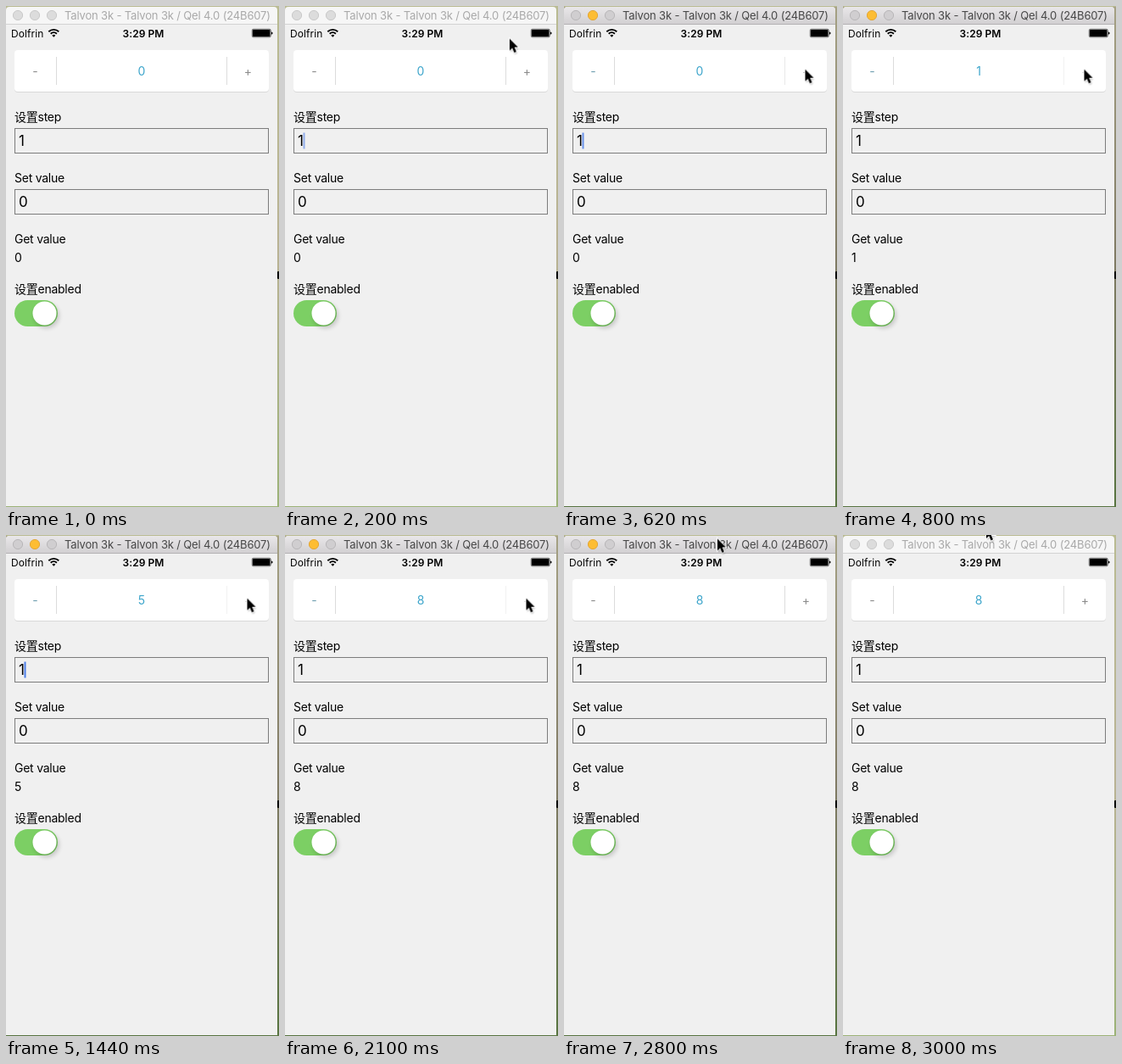
Recreate the animation shown at these times as an HTML page. Size 322 by 591 pixels, loop 3.04 s.

```html
<!DOCTYPE html>
<html lang="en">
<head>
<meta charset="utf-8">
<title>Stepper demo</title>
<style>
  html, body { margin: 0; width: 100%; height: 100%; overflow: hidden; background: #f0f0f0; }
  svg { display: block; width: 322px; height: 591px; }
  text { font-family: Inter, "Noto Sans CJK SC", "Noto Sans CJK", Roboto, sans-serif; fill: #000; }

  .title { font-size: 13px; letter-spacing: -.15px; animation: title 3040ms step-end infinite; }
  .status { font-size: 12px; letter-spacing: .1px; }
  .clock { font-size: 12px; font-weight: 600; letter-spacing: .05px; text-anchor: middle; }
  .label { font-size: 14px; letter-spacing: -.25px; }
  .field { font-size: 17px; }
  .mid { font-size: 14px; text-anchor: middle; }
  .count { fill: #3da5cb; }
  .sign { fill: #8c8c8c; }
  .box { fill: none; stroke: #7c7c7c; }

  .active { animation: active 3040ms step-end infinite; }
  .caret { animation: caret 3040ms linear infinite; }
  .press { animation: press 3040ms linear infinite; }
  .minus { animation: minus 3040ms step-end infinite; }
  .cursor { animation: cursor 3040ms linear infinite; }

  @keyframes title {
    0%, 97.37% { fill: #a9a9a9; }
    19.74% { fill: #474747; }
  }
  @keyframes active {
    0%, 97.37% { opacity: 0; }
    19.74% { opacity: 1; }
  }
  @keyframes caret {
    0%, 3.95% { opacity: 0; }
    8.55%, 19.74% { opacity: 1; }
    23.68%, 36.84% { opacity: 0; }
    41.45%, 52.63% { opacity: 1; }
    56.58%, 69.74% { opacity: 0; }
    74.34%, 85.53% { opacity: 1; }
    89.47%, 100% { opacity: 0; }
  }
  @keyframes press {
    0%, 19.74% { opacity: 1; }
    21.05%, 71% { opacity: .35; }
    75.66%, 100% { opacity: 1; }
  }
  @keyframes minus {
    0%, 84.87% { fill: #8c8c8c; }
    12.5% { fill: #6f9fb0; }
  }
  @keyframes cursor {
    0% { transform: translate(238px, -30px); animation-timing-function: step-end; }
    1.316% { transform: translate(240px, -14px); animation-timing-function: ease-out; }
    13.816% { transform: translate(281.5px, 73.7px); animation-timing-function: step-end; }
    17.105%, 84.2% { transform: translate(284.5px, 74.7px); }
    84.21% { transform: translate(284.5px, 74.7px); animation-timing-function: cubic-bezier(.35, 0, .6, 1); }
    92.105% { transform: translate(181px, 4.5px); animation-timing-function: ease-out; }
    98.684%, 100% { transform: translate(169px, -10px); }
  }
</style>
</head>
<body>
<svg viewBox="0 0 322 591" xmlns="http://www.w3.org/2000/svg">
  <defs>
    <linearGradient id="desk" x2="0" y2="1">
      <stop offset="0" stop-color="#b9bb92"/>
      <stop offset=".5" stop-color="#b9b294"/>
      <stop offset="1" stop-color="#9cb277"/>
    </linearGradient>
    <linearGradient id="shade" x2="0" y2="1">
      <stop offset="0" stop-color="#a5a184"/>
      <stop offset=".5" stop-color="#807a64"/>
      <stop offset="1" stop-color="#587440"/>
    </linearGradient>
    <linearGradient id="bar" x2="0" y2="1">
      <stop offset="0" stop-color="#e9e7e9"/>
      <stop offset="1" stop-color="#d1cfd1"/>
    </linearGradient>
    <filter id="soft" x="-60%" y="-60%" width="220%" height="220%">
      <feGaussianBlur stdDeviation="2.6"/>
    </filter>
    <filter id="near" x="-60%" y="-60%" width="220%" height="220%">
      <feGaussianBlur stdDeviation="1.2"/>
    </filter>
    <path id="top" d="M0 22V5a4 4 0 0 1 4-4H316a4 4 0 0 1 4 4V22Z"/>
    <path id="arrow" d="M0 0V14l3.200-3 2.300 5.400 2.500-1.100L5.700 10H10Z"/>
  </defs>

  <!-- desktop and window -->
  <rect width="322" height="591" fill="url(#desk)"/>
  <rect class="active" y="1" width="322" height="590" fill="url(#shade)"/>
  <rect y="20" width="320" height="570" fill="#f0f0f0"/>
  <path d="M322 313h-1.500l-.5 1v7l.5 1H322Z"/>

  <!-- title bar -->
  <use href="#top" fill="#f6f6f6"/>
  <path d="M0 21.500H320" stroke="#d3d3d3"/>
  <g fill="#dcdcdc" stroke="#c9c9c9">
    <circle cx="14" cy="11" r="5.600"/>
    <circle cx="34" cy="11" r="5.600"/>
    <circle cx="54" cy="11" r="5.600"/>
  </g>
  <g class="active">
    <use href="#top" fill="url(#bar)"/>
    <path d="M0 21.500H320" stroke="#b3b1b3"/>
    <g fill="#d0ced0" stroke="#b8b6b8">
      <circle cx="14" cy="11" r="5.600"/>
      <circle cx="34" cy="11" r="5.600" fill="#fdbd33" stroke="#e2a637"/>
      <circle cx="54" cy="11" r="5.600"/>
    </g>
  </g>
  <text class="title" x="69" y="16">Talvon 3k - Talvon 3k / Qel 4.0 (24B607)</text>

  <!-- status bar -->
  <text class="status" x="6" y="36.500">Dolfrin</text>
  <g fill="none" stroke="#000" stroke-width="1.900">
    <path d="M50.300 30.300a8.700 8.700 0 0 1 12 0"/>
    <path d="M52.700 32.700a5.300 5.300 0 0 1 7.200 0"/>
  </g>
  <path d="M56.300 36.800l-2-2.100a2.800 2.800 0 0 1 4 0Z"/>
  <text class="clock" x="162" y="36.500">3:29 PM</text>
  <rect x="290.250" y="27.250" width="22" height="9.500" rx="1.600" fill="none" stroke="#000" stroke-width=".6"/>
  <rect x="291" y="28" width="20.500" height="8" rx=".8"/>
  <path d="M313 30.500q1.600 .3 1.600 1.600t-1.600 1.600Z"/>

  <!-- stepper -->
  <rect x="10" y="53" width="300" height="49" rx="4" fill="#d9d9d9"/>
  <rect x="10" y="52" width="300" height="49" rx="4" fill="#fff"/>
  <path d="M59.500 60V93" stroke="#dcdcdc"/>
  <path class="press" d="M260.500 60V93" stroke="#dcdcdc"/>
  <text class="mid sign minus" x="34.500" y="82">-</text>
  <text class="mid count" data-count x="160" y="82">0</text>
  <text class="mid sign press" x="285.300" y="82">+</text>

  <!-- form -->
  <text class="label" x="10" y="136">设置step</text>
  <rect class="box" x="10.500" y="144.500" width="299" height="29"/>
  <text class="field" x="15" y="165">1</text>
  <rect class="caret" x="21.500" y="149.500" width="2" height="19" fill="#4a7de8"/>

  <text class="label" x="10" y="208">Set value</text>
  <rect class="box" x="10.500" y="216.500" width="299" height="29"/>
  <text class="field" x="15" y="237">0</text>

  <text class="label" x="10" y="280">Get value</text>
  <text class="label" data-count x="10" y="302">0</text>

  <text class="label" x="10" y="339">设置enabled</text>
  <rect x="10" y="347" width="51" height="31" rx="15.500" fill="#7ccf64"/>
  <circle cx="48" cy="365.500" r="15" opacity=".16" filter="url(#soft)"/>
  <circle cx="45.500" cy="362.500" r="14" fill="#fff"/>

  <!-- pointer -->
  <g class="cursor">
    <use href="#arrow" x=".8" y="1.500" opacity=".4" filter="url(#near)"/>
    <use href="#arrow" stroke="#fff" stroke-width="1.800" paint-order="stroke"/>
  </g>
</svg>
<script>
  const LOOP = 3040;
  const taps = [660, 960, 1120, 1260, 1440, 1600, 1720, 1920];
  const counts = document.querySelectorAll('[data-count]');
  let start;

  function draw(now) {
    start ??= now;
    const t = (now - start) % LOOP;
    const value = String(taps.filter(tap => t >= tap).length);
    for (const el of counts) {
      if (el.textContent !== value) el.textContent = value;
    }
    requestAnimationFrame(draw);
  }
  requestAnimationFrame(draw);
</script>
</body>
</html>
```
